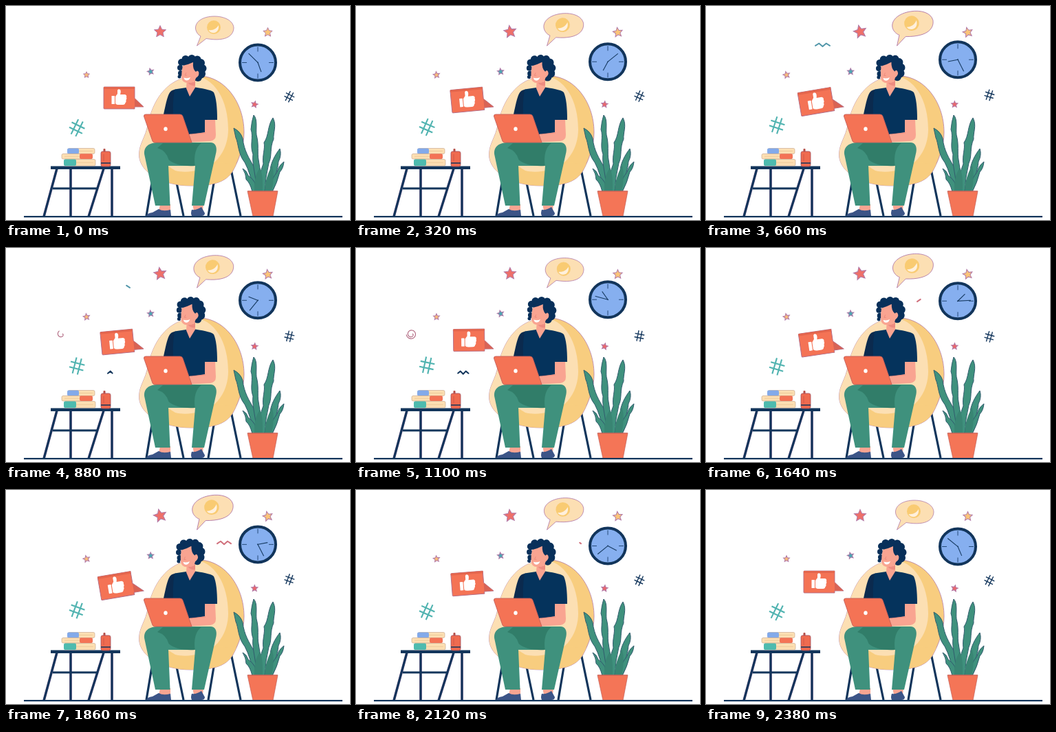
An HTML page with a canvas that plays this animation: 500x312 px, repeating every 2.4 s.

```html
<!DOCTYPE html>
<html lang="en">
<head>
<meta charset="utf-8">
<style>
html, body { margin: 0; width: 100%; height: 100%; overflow: hidden; background: #fff; }
canvas { display: block; width: 500px; height: 312px; }
</style>
</head>
<body>
<canvas id="stage" width="500" height="312"></canvas>
<script>
const ctx = document.getElementById('stage').getContext('2d');
const LOOP = 2400, STEP = 20, TAU = Math.PI * 2, DEG = Math.PI / 180;
const NAVY = '#12355b', SHIRT = '#05335c', ORANGE = '#f47355', TEAL = '#3f917d', DEEP = '#317d69';
const YELLOW = '#f8cd7f', CREAM = '#fcdfb3', SKIN = '#f9a491', AQUA = '#50b3b0', FRINGE = '#b27aa8';

function paint(shape, fill, stroke, width = 0.8) {
  const path = typeof shape === 'string' ? new Path2D(shape) : shape;
  if (fill) { ctx.fillStyle = fill; ctx.fill(path); }
  if (stroke) { ctx.strokeStyle = stroke; ctx.lineWidth = width; ctx.stroke(path); }
}
function ellipse(x, y, rx, ry, fill, stroke, width) {
  const path = new Path2D();
  path.ellipse(x, y, rx, ry, 0, 0, TAU);
  paint(path, fill, stroke, width);
}
const circle = (x, y, r, ...style) => ellipse(x, y, r, r, ...style);
function box(x, y, w, h, r, ...style) {
  const path = new Path2D();
  path.roundRect(x, y, w, h, r);
  paint(path, ...style);
}
function at(x, y, degrees, scale, draw) {
  ctx.save();
  ctx.translate(x, y);
  ctx.rotate(degrees * DEG);
  ctx.scale(scale, scale);
  draw();
  ctx.restore();
}
// Turns and scales artwork given in stage coordinates around a pivot.
const around = (x, y, degrees, scale, draw) =>
  at(x, y, degrees, scale, () => { ctx.translate(-x, -y); draw(); });

function star(x, y, r, turn, scale, fill) {
  at(x, y, turn, scale, () => {
    const path = new Path2D();
    for (let i = 0; i < 10; i++) {
      const a = i * Math.PI / 5, d = i % 2 ? r * 0.47 : r;
      path.lineTo(d * Math.sin(a), -d * Math.cos(a));
    }
    path.closePath();
    paint(path, fill, FRINGE, 1);
  });
}

function hash(x, y, size, turn, color) {
  at(x, y, turn, size, () => {
    paint('M-3.7-12V12M3.7-12V12M-10.5-4H10.5M-10.5 4H10.5', null, color, 2.1);
  });
}

function zigzag(x, y, w, h) {
  return [0, 1, 2, 3, 4].map(i => [x + w * i / 4, y + (i % 2 ? -h : h) * (i === 0 || i === 4 ? 0.5 : 1)]);
}
function spiral(x, y) {
  return Array.from({ length: 40 }, (_, i) => {
    const k = i / 39, a = Math.PI * (0.95 - 3 * (1 - k)), r = 1.8 + 5.3 * Math.sqrt(k);
    return [x + r * Math.cos(a), y + r * Math.sin(a)];
  });
}
const doodles = [
  { points: zigzag(159, 56.7, 21, 2.2), color: '#5297aa', from: 340, to: 980 },
  { points: zigzag(148, 181.7, 15.5, 2.1), color: NAVY, from: 720, to: 1430 },
  { points: spiral(80.3, 125.5), color: '#b0667f', from: 730, to: 1460, width: 1.1 },
  { points: zigzag(307, 77, 20, 2.3), color: '#d0707c', from: 1540, to: 2180 }
];
const ease = k => (1 - Math.cos(Math.PI * Math.min(1, Math.max(0, k)))) / 2;

// Each line is drawn from its start, then erased in the same direction.
function doodle({ points, color, from, to, width = 2 }, t) {
  if (t <= from || t >= to) return;
  const path = new Path2D();
  let length = 0;
  points.forEach(([x, y], i) => {
    path.lineTo(x, y);
    if (i) length += Math.hypot(x - points[i - 1][0], y - points[i - 1][1]);
  });
  const k = 2 * (t - from) / (to - from);
  const head = ease(k) * length, tail = ease(k - 1) * length;
  ctx.save();
  ctx.lineCap = ctx.lineJoin = 'round';
  ctx.setLineDash([head - tail, length * 2]);
  ctx.lineDashOffset = -tail;
  paint(path, null, color, width);
  ctx.restore();
}

function clock(t) {
  at(366, 78.8 + 3.7 * Math.cos(TAU * t / LOOP), 0, 1, () => {
    circle(0, 0, 26, '#86afef', NAVY, 4);
    paint('M0-23V-16M0 23V16M-23 0H-16M23 0H16', null, '#244a78', 1);
    const hand = (degrees, length) => at(0, 0, degrees, 1, () => paint(`M0 1V${-length}`, null, '#173b62', 1.1));
    hand(315 + t * 0.3, 19);
    hand(160 + t * 0.15, 14.5);
  });
}

function smileBubble(sway) {
  around(278, 57.5, -9.5 * sway, 1 + 0.08 * sway, () => {
    paint('M283 44L277.5 58L291 47.5C323 53 331 41 331 31.500C330 21 317 15 303 15C287 15 275.500 22 275.500 32C275.500 37 279 42 283 44Z', CREAM, FRINGE);
    circle(302, 31, 10, '#f9cb72');
    paint('M294.500 35C301 36 306 33 309 28C310 36 305 40 300 39C297 38.500 295.500 37 294.500 35Z', '#fff0dc');
  });
}

function likeBubble(sway) {
  around(200, 147, -10 * sway, 1 + 0.08 * sway, () => {
    paint('M143 118H187V134.500L200 147H187V150H143Q142 150 142 149V119Q142 118 143 118Z', ORANGE, '#b46c86', 0.9);
    paint('M142 118H187V121H142Z', '#e4664d');
    paint('M187 135L199 146.500H187Z', '#d86355');
    box(153.500, 131, 4.500, 12, 0.5, '#fff');
    paint('M159 132L162 128L162 123Q163 120 166 122Q167.500 124 166 129H173Q176 130 175 133Q176 135 174.500 137Q175 140 173.500 141Q173 144 170 144H164Q160 144 159 142Z', '#fff');
  });
}

function table() {
  paint('M74 237L55 307M94 237V307M142 237L120 307M154 237V307', null, '#8d6c99', 3.7);
  paint('M74 237L55 307M94 237V307M142 237L120 307M154 237V307M68 266H133', null, NAVY, 3);
  box(65, 233.500, 101, 4.500, 0, NAVY);

  const book = (x, y, w, h, coverX, coverW, cover) => {
    box(x, y, w, h, 2, CREAM, '#c3a188', 0.6);
    paint(`M${x + 4} ${y + h / 2}H${x + w - 3}`, null, '#ecc894', 0.8);
    box(coverX, y, coverW, h, 2, cover);
  };
  book(90, 207.500, 39, 8, 89, 17, '#83aaea');
  book(81, 215.500, 44, 7.500, 107, 19, ORANGE);
  book(85, 223.500, 45, 9.500, 84, 18, '#4ebbae');

  box(141.500, 208, 3, 5, 1, '#b5504a');
  box(138, 212, 14, 22, 2.500, '#ef6b50', '#9c4d5b', 0.8);
  paint('M138 229H152', null, NAVY, 1.5);
  paint('M142 216V226', null, '#d45748', 1);
}

function chair() {
  paint('M213 252L204 306M248 258L258 306M305 240L294 306M327 238L341 306', null, NAVY, 3.2);
  const egg = new Path2D('M270 102.500C315 96 346 139 346 184C346 205 338 225 330 240C319 258 300 262 268 262C229 262 193 243 193.500 216C194 200 203 191 206 174C213 139 232 107 270 102.500Z');
  paint(egg, YELLOW, FRINGE);
  ctx.save();
  ctx.clip(egg);
  paint('M270 101C304 103 323 138 323 180C323 210 304 244 255 245C240 249 230 255 222 258L180 250V100Z', CREAM);
  paint('M222 225C222 245 232 256 246 263H300C322 258 330 240 335 230L300 228C290 241 260 244 246 240Z', YELLOW);
  ctx.restore();
}

function head(sway) {
  around(267, 120, -4 * sway, 1, () => {
    [[255, 82, 5], [261, 77.500, 5.500], [270, 76.500, 5.500], [278, 78, 5.500], [283, 83, 6], [285.500, 91, 6],
     [283.500, 99, 6.500], [279, 104, 6], [272, 90, 15], [253, 90, 4], [254, 98, 4], [252, 103, 2.500]]
      .forEach(([x, y, r]) => circle(x, y, r, '#08305a'));
    paint('M257 87Q255 95 255 104Q256 112 264 112L274 111L276 105Q282 101 280 96Q278 93 276 96Q271 92 272 82Q266 85 257 87Z', SKIN);
    paint('M258.500 104.500Q264 106 268 104Q266 109 262 108.500Q259 108 258.500 104.500Z', '#fff');
    paint('M262 97L260 101H263', null, '#e98679', 0.8);
  });
}

function person(sway) {
  paint('M224 289H239V299H222ZM271 289H287L286 298H273Z', SKIN);
  paint('M204 306Q205 302 213 301L222 296Q228 300 239 297L240 306Z', '#3c5587');
  paint('M270 297Q277 298 284 293L289 302Q289 306 284 306H270Q268 302 270 297Z', '#3c5587');
  paint('M222 199H297C304 199 307 205 305.500 213L288 291H270L275 233H236L238.500 291H217L201.500 218C199 206 207 199 222 199Z', TEAL);
  paint('M228 200H284Q272 208 274.500 233C258 234 244 231 236.500 224Q233 211 220 207Z', DEEP);

  paint('M245 122C237 123 235 129 229 158L246 166Z', '#0b2a4e');
  paint('M262 119L245 121.500Q241 145 244 169L250 187H289V166H307Q307 137 302 126Q299 122 275 118.500Z', SHIRT);
  paint('M289 166H304L305 188Q305 196 297 197L264 199V188L289 184Z', SKIN);
  paint('M267 187L290 185', null, '#ee8a7d', 0.8);
  paint('M263 105H275V119L267 132L262 120Z', SKIN);
  paint('M264 111Q270 114 275 108V116Q267 117 264 111Z', '#ed8c80');
  head(sway);

  paint('M203 158H253Q256 158 257 161L270 199H216Q214 199 213 197L200.500 161Q200 158 203 158Z', ORANGE, '#c55f5b', 0.9);
  ellipse(232, 179.200, 2.7, 3, '#fff');
}

function plant() {
  const leaves = [
    'M331 178Q341 183 344 193C346 211 354 223 359 232Q368 249 369 271H360Q356 245 347 228C337 216 338 200 334 192Z',
    'M360 159C366 165 363 178 364 188C368 202 365 214 367 224Q371 248 374 271H364C364 247 357 231 359 216C354 204 360 190 356 180Q357 168 360 159Z',
    'M388 163C394 174 388 185 389 194C383 207 387 219 382 229Q377 250 376 271H368Q367 246 374 230C372 219 377 208 375 199C382 190 380 174 388 163Z',
    'M344 237Q350 240 352 247Q363 254 366 271H358Q355 258 349 253Q349 245 344 237Z',
    'M398 208Q401 217 396 227C395 242 388 253 386 271H376Q378 252 384 241C384 230 391 217 398 208Z',
    'M404 227Q403 237 398 242Q394 258 387 271H380Q386 252 394 242Q396 233 404 227Z'
  ];
  leaves.forEach(leaf => paint(leaf, TEAL, '#315b6d', 1));
  paint('M361 271Q360 248 369 236Q374 246 373 271ZM376 271Q376 251 387 232Q391 247 386 271Z', '#398573');
  paint('M351 270H395L388 307H359Z', '#f47557', '#c25f59', 0.7);
  paint('M351 270H395', null, '#cf6354', 1.2);
}

function scene(t) {
  ctx.clearRect(0, 0, 500, 312);
  const sway = (1 - Math.cos(TAU * t / 1200)) / 2;
  const drift = Math.cos(TAU * t / LOOP);
  clock(t);
  star(224, 37.500, 9, -14 * sway, 1 + 0.08 * sway, '#ee7069');
  star(380.500, 38.500, 7, -14 * sway, 1 + 0.06 * sway, '#fac579');
  star(117, 100.500, 4.700, -14 * sway, 1 + 0.08 * sway, '#f9bb79');
  star(210.200, 95.700, 5, -14 * (1 - sway), 1, '#4ba6b2');
  star(361.300, 143.500, 5, 14 * (1 - sway), 1, '#eb6769');
  hash(103.200, 174.300 + 3.400 * drift, 1, 19 + 7 * drift, AQUA);
  hash(411.900, 130.200 + 2 * drift, 0.66, 19 + 8 * drift, NAVY);
  doodles.forEach(line => doodle(line, t));
  smileBubble(sway);
  likeBubble(sway);
  table();
  chair();
  person(sway);
  plant();
  box(26, 306, 463, 2.300, 0, NAVY);
}

const start = performance.now();
function frame() {
  const t = (performance.now() - start) % LOOP;
  scene(Math.floor(t / STEP) * STEP);
  requestAnimationFrame(frame);
}
frame();
</script>
</body>
</html>
```
